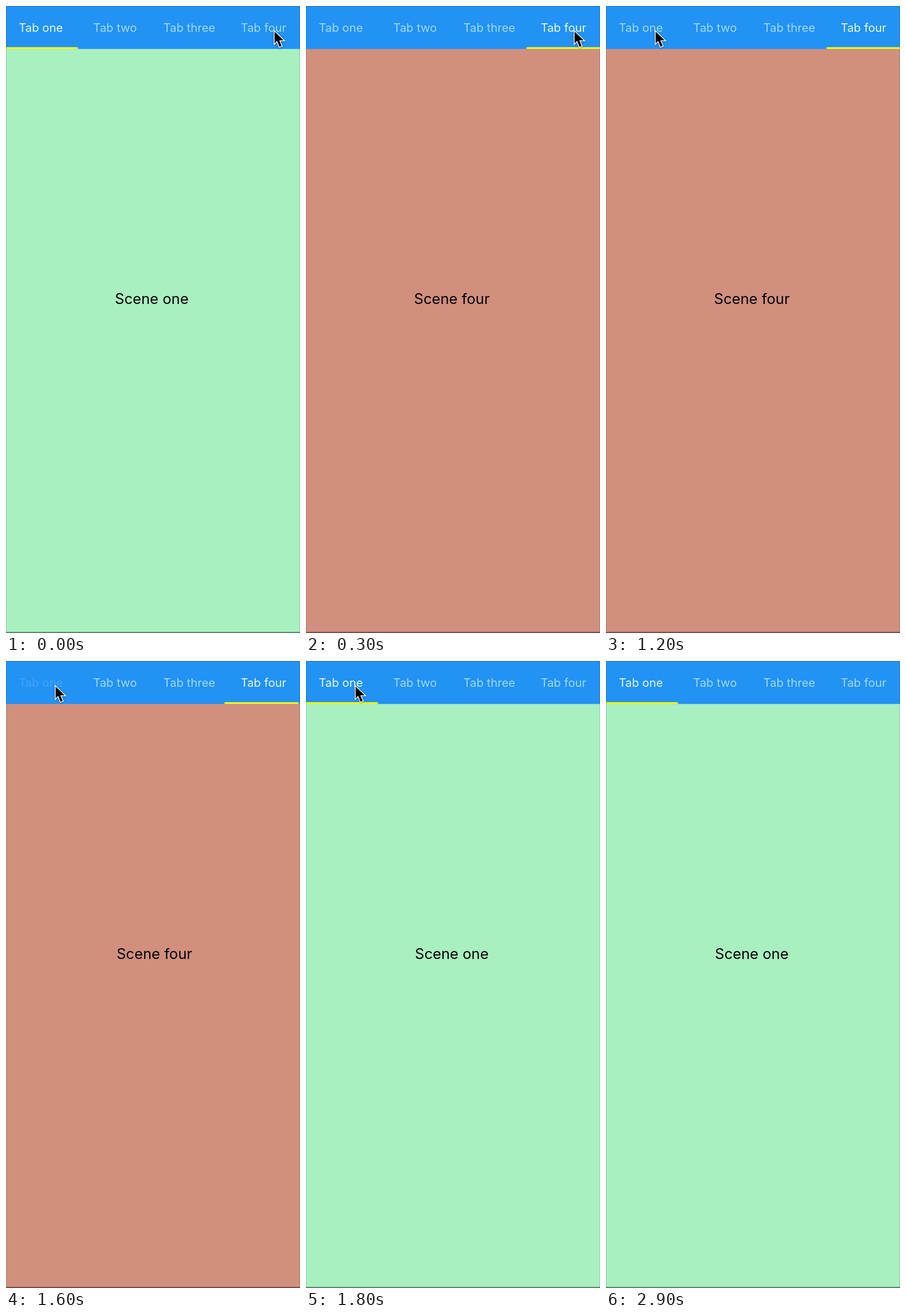
These frames come from a looping animation (513 px wide and 1092 px high, 3000 ms). An HTML page:

```html
<!DOCTYPE html>
<html lang="en">
<head>
<meta charset="utf-8">
<title>Sliding tabs</title>
<style>
  html, body { margin: 0; width: 100%; height: 100%; overflow: hidden; }
  svg { display: block; width: 100%; height: 100%; }
  text { font-family: Inter, Roboto, sans-serif; text-anchor: middle; }
  .tab { font-size: 20.3px; fill: #a0d9fc; }
  .tab.active { fill: #e6f9ff; }
  .scene { font-size: 25.6px; fill: #000; }
  #cursor { filter: drop-shadow(0 1.5px 1.5px rgba(0, 0, 0, .35)); }
</style>
</head>
<body>
<svg viewBox="0 0 513 1092" preserveAspectRatio="none">
  <g id="pages">
    <rect x="-4" y="74" width="518" height="1018" fill="#a9f0c1"/>
    <text class="scene" x="254.3" y="518.5">Scene one</text>
    <rect x="514" y="74" width="518" height="1018" fill="#d28f7e"/>
    <rect x="514" y="74" width="1" height="1018" opacity=".1"/>
    <text class="scene" x="772.5" y="518.5">Scene four</text>
  </g>
  <rect width="513" height="74.8" fill="#2292f5"/>
  <g id="tabs"></g>
  <rect id="indicator" x="-4" y="71.8" width="129.5" height="3" rx="1.5" fill="#ff0"/>
  <rect width="513" height="1" opacity=".15"/>
  <rect width="1" height="1092" opacity=".15"/>
  <rect x="512" width="1" height="1092" opacity=".15"/>
  <rect y="1090" width="513" height="2" opacity=".45"/>
  <path id="cursor" d="M1.6 3.6V24.2L6.1 19.8L10.2 30L13.9 28.5L9.8 18.8H17.3Z"
    stroke="#fff" stroke-width="2.8" paint-order="stroke"/>
</svg>
<script>
const LOOP = 3000, STEP = 100, PAGE = 518, TAB = 129.5;
const SLIDE = 165, OPEN_LAST = 134, OPEN_FIRST = 1591, PRESS = 60;
const onLast = { x: 467, y: 41 }, onFirst = { x: 85, y: 41 };
const byId = id => document.getElementById(id);

const ramp = (time, start, length) => Math.min(1, Math.max(0, (time - start) / length));
const ease = u => u * u * (3 - 2 * u);
const slide = (time, start) => ease(ramp(time, start, SLIDE));
const place = (element, x, y) => element.setAttribute('transform', `translate(${x} ${y})`);

// A tapped tab dims at once and recovers while the pages slide.
const pressOpacity = (time, start) =>
  time < start - PRESS ? 1 : .2 + .8 * ramp(time, start, SLIDE);

const tabs = ['one', 'two', 'three', 'four'].map((name, index) => {
  const label = document.createElementNS('http://www.w3.org/2000/svg', 'text');
  label.textContent = `Tab ${name}`;
  label.setAttribute('class', 'tab');
  label.setAttribute('x', 60.8 + index * TAB);
  label.setAttribute('y', 44.6);
  byId('tabs').append(label);
  return label;
});

// The pointer arcs across to the first tab, rests, then leaves at the top.
function placeCursor(time) {
  const across = ramp(time, 500, 563);
  const away = ease(ramp(time, 2350, 300));
  const x = onLast.x + (onFirst.x - onLast.x) * ease(across) + 10 * away;
  const y = onFirst.y + 26 * Math.sin(Math.PI * across) - 80 * away;
  place(byId('cursor'), x, y);
}

function draw(time) {
  const progress = slide(time, OPEN_LAST) - slide(time, OPEN_FIRST);
  const position = progress * (tabs.length - 1);
  place(byId('pages'), -PAGE * progress, 0);
  place(byId('indicator'), TAB * position, 0);
  tabs.forEach((tab, index) =>
    tab.classList.toggle('active', index === Math.round(position)));
  tabs[0].style.opacity = pressOpacity(time, OPEN_FIRST);
  tabs[3].style.opacity = pressOpacity(time, OPEN_LAST);
  placeCursor(time);
}

const start = performance.now();
function tick() {
  const elapsed = (performance.now() - start) % LOOP;
  draw(Math.floor(elapsed / STEP) * STEP);
  requestAnimationFrame(tick);
}
tick();
</script>
</body>
</html>
```
